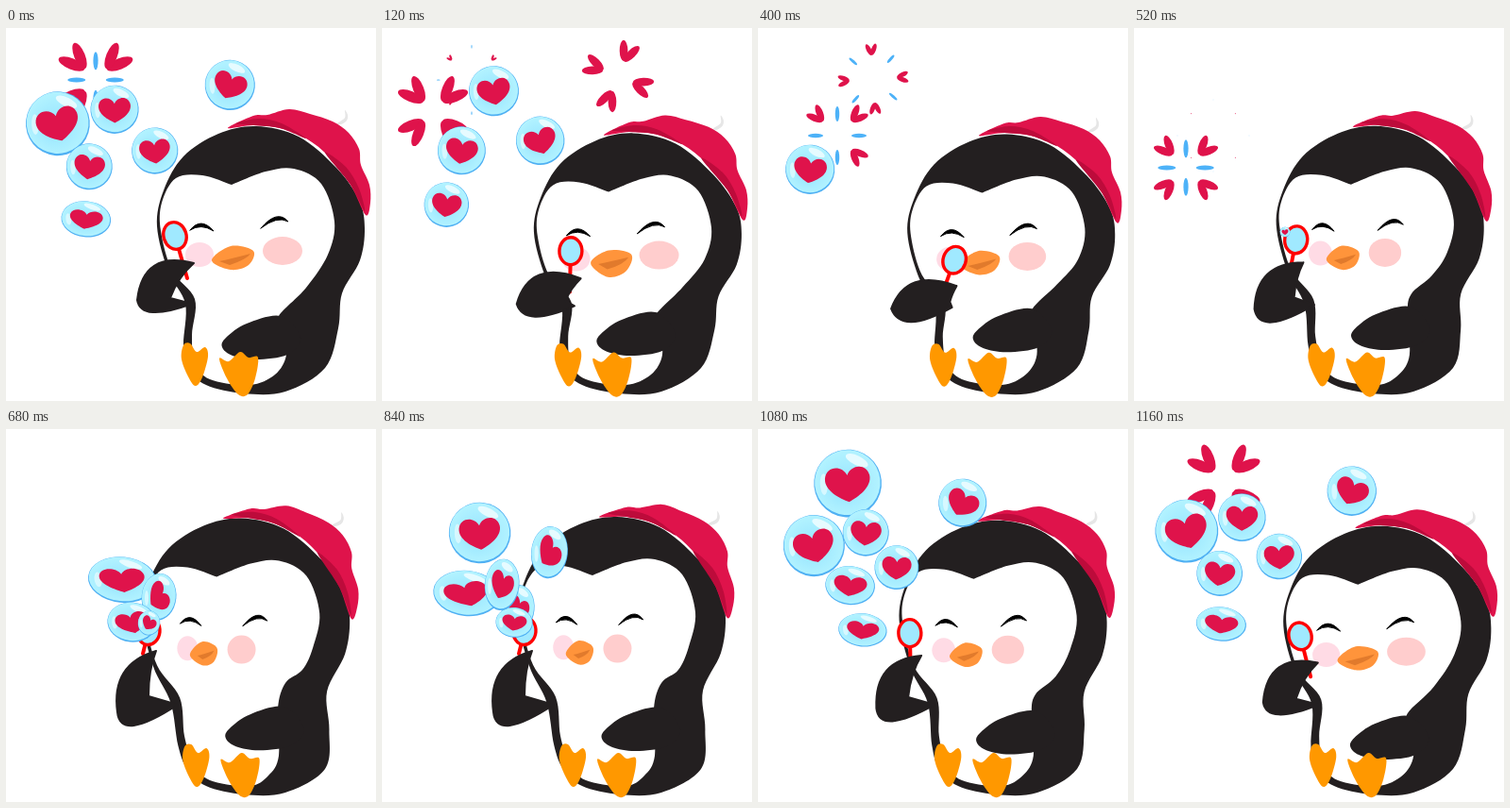
Recreate the animation shown at these times as an HTML page with a canvas. Size 392 by 395 pixels, loop 1200 ms.

```html
<!DOCTYPE html>
<html lang="en">
<head>
<meta charset="utf-8">
<title>Penguin blowing bubbles</title>
<style>
html, body { margin: 0; width: 100%; height: 100%; overflow: hidden; background: #fff; }
canvas { display: block; width: 392px; height: 395px; }
</style>
</head>
<body>
<canvas id="stage" width="392" height="395"></canvas>
<script>
const ctx = document.getElementById('stage').getContext('2d');
const LOOP = 1200, STEP = 40, TAU = Math.PI * 2;
const BLACK = '#231f20', RED = '#df134b', DARK = '#bd0b3b';
const clamp = v => Math.max(0, Math.min(1, v));
const mix = (a, b, u) => a + (b - a) * u;
const ramp = (t, from, to) => {
  const u = clamp((t - from) / (to - from));
  return u * u * (3 - 2 * u);
};

// Outlines of the upright penguin; warp() leans and nods them.
const body = [265, 104, 310, 115, 350, 148, 374, 182, 380, 212, 375, 246, 356, 281, 352, 318, 338, 360,
  296, 385, 252, 387, 212, 378, 192, 360, 188, 335, 190, 292, 172, 258, 160, 210, 167, 172, 188, 136, 225, 112];
const wing = [291, 305, 255, 313, 233, 328, 229, 338, 240, 347, 265, 351, 298, 346, 312, 328];
const leftFoot = [188, 336, 195, 334, 202, 343, 211, 338, 214, 348, 208, 370, 201, 379, 194, 371, 186, 351];
const rightFoot = [226, 350, 236, 353, 248, 343, 257, 349, 267, 349, 264, 371, 256, 388, 246, 388, 234, 371];
const hat = [235, 106, 262, 93, 277, 92, 300, 86, 322, 91, 346, 99, 363, 111, 374, 128, 376, 145,
  385, 166, 386, 185, 381, 198, 365, 166, 343, 137, 318, 117, 290, 106, 262, 103];

function curve(v, open) {
  const n = v.length / 2;
  const p = i => {
    const j = open ? Math.max(0, Math.min(n - 1, i)) : (i + n) % n;
    return [v[2 * j], v[2 * j + 1]];
  };
  ctx.beginPath();
  ctx.moveTo(v[0], v[1]);
  for (let i = 0; i < (open ? n - 1 : n); i++) {
    const [a, b, c, d] = [p(i - 1), p(i), p(i + 1), p(i + 2)];
    ctx.bezierCurveTo(b[0] + (c[0] - a[0]) / 6, b[1] + (c[1] - a[1]) / 6,
      c[0] - (d[0] - b[0]) / 6, c[1] - (d[1] - b[1]) / 6, c[0], c[1]);
  }
  ctx.closePath();
}
function blob(v, color, open) {
  curve(v, open);
  ctx.fillStyle = color;
  ctx.fill();
}
function oval(x, y, rx, ry, color, tilt = 0) {
  ctx.beginPath();
  ctx.ellipse(x, y, rx, ry, tilt, 0, TAU);
  ctx.fillStyle = color;
  ctx.fill();
}
function local(x, y, angle, draw) {
  ctx.save();
  ctx.translate(x, y);
  ctx.rotate(angle);
  draw();
  ctx.restore();
}
const move = (v, dx, dy) => v.map((n, i) => n + (i % 2 ? dy : dx));

function poseAt(t) {
  return {
    lean: ramp(t, 290, 680) - ramp(t, 1000, 1200),
    nod: ramp(t, 0, 220) - ramp(t, 250, 800),
    reach: ramp(t, 20, 230) - ramp(t, 300, 620),
    open: ramp(t, 80, 220) - ramp(t, 260, 400)
  };
}

// The higher a point, the more it follows the head.
function warp(v, { lean, nod }) {
  return v.map((n, i) => {
    const y = v[i | 1], k = clamp((360 - y) / 180);
    return i % 2
      ? n + 13 * nod * k - 11 * lean * clamp((310 - y) / 80)
      : n + 2 * nod * k - 16 * lean * clamp((360 - y) / 70);
  });
}

function drawBody(p) {
  blob(warp(body, p), BLACK);
  const right = warp([239, 166, 275, 152, 305, 149, 334, 165, 348, 205, 341, 240], p);
  const left = warp([258, 378, 216, 372, 200, 354, 197, 325, 200, 287, 176, 257, 164, 215, 165, 185,
    180, 159, 208, 156, 239, 166], p);
  const l = p.lean;
  const side = [318 - 4 * l, 275 - 20 * l, 289 + 7 * l, 305 - 36 * l, 293 - 5 * l, 318 - 22 * l,
    297 - 8 * l, 346, 285 - 7 * l, 367];
  blob([...right, ...side, ...left], '#fff', true);
  blob(move(wing, 4 * l - 2 * p.nod, -10 * l - 7 * p.nod), BLACK);
}

function drawHat({ lean, nod }) {
  local(235 - 5 * lean, 106 - 13 * lean + 13 * nod, .105 * lean - .025 * nod, () => {
    ctx.translate(-235, -106);
    blob([351, 101, 359, 95, 359, 87, 362, 92, 361, 98, 355, 102], '#e6e6e6');
    blob(hat, RED);
    blob([244, 101, 268, 96, 292, 101, 318, 117, 290, 106, 262, 103], DARK);
    blob([338, 132, 360, 147, 374, 170, 380, 194, 365, 166], DARK);
  });
}

function drawEye(x0, y0, px, py, x1, y1) {
  const cx = 2 * px - (x0 + x1) / 2, cy = 2 * py - (y0 + y1) / 2;
  ctx.beginPath();
  ctx.moveTo(x0, y0);
  ctx.quadraticCurveTo(cx, cy, x1, y1);
  ctx.quadraticCurveTo(cx, cy + 7, x0, y0);
  ctx.fillStyle = ctx.strokeStyle = '#000';
  ctx.lineWidth = 1;
  ctx.fill();
  ctx.stroke();
}

function drawFace({ lean, nod, open }) {
  // Turning the head narrows the face, the lower half most.
  const turn = (v, squeeze, drop) => v.map((n, i) => {
    const d = v[i & ~1] - 200;
    return i % 2 ? n - lean * (9 - .06 * d) + drop * nod : n - lean * (11 + squeeze * d) + nod;
  });
  const low = v => turn(v, .35, 8);
  oval(...low([205, 240]), 15 - 4 * lean, 13, '#ffdbe5');
  oval(...low([293, 236]), 21 - 6 * lean, 15, '#ffcdcd');
  drawEye(...turn([195, 214, 207, 207, 220, 215], .115, 10));
  drawEye(...turn([270, 212, 286, 200, 299, 205], .115, 10));

  const o = open, b = move(low([218 + 5 * o, 246 - 8 * o, 238, 231, 262, 236 - 4 * o,
    257 - 3 * o, 251 + 10 * o, 238 - 4 * o, 256 + 16 * o]), 8 * o - 6 * lean, 0);
  const [lx, ly, , , rx, ry, qx, qy, bx, by] = b;
  blob(b, '#ff943b');
  ctx.beginPath();
  ctx.moveTo(lx + 8, ly + 1);
  ctx.quadraticCurveTo(mix(lx, rx, .5), mix(ly, ry, .5) + 3, rx - 3, ry + 3);
  ctx.quadraticCurveTo(mix(rx, qx, .8) - 3, mix(ry, qy, .6), mix(lx, bx, .8) + 3, mix(ly + 5, by - 2, o));
  ctx.closePath();
  ctx.fillStyle = '#e17a2c';
  ctx.fill();
}

function drawArm({ lean, reach }) {
  const at = (x, y, rx, ry, lx, ly) => [x + rx * reach + lx * lean, y + ry * reach + ly * lean];

  const [x, y] = at(179, 220, 45, 35, -28, -6);
  const [hx, hy] = at(13, 45, -30, -4, -19, -21);
  const d = Math.hypot(hx, hy);
  ctx.strokeStyle = '#f00';
  ctx.lineCap = 'round';
  ctx.lineWidth = 4;
  ctx.beginPath();
  ctx.moveTo(x + hx / d * 14, y + hy / d * 14);
  ctx.lineTo(x + hx, y + hy);
  ctx.stroke();
  oval(x, y, 12, 14.5, '#a0e9ff', -.3 + .7 * reach + .4 * lean);
  ctx.lineWidth = 3.4;
  ctx.stroke();

  const hand = at(199, 249, 25, 35, -40, -14);
  const elbow = at(139, 288, 8, 9, -21, 12);
  ctx.beginPath();
  ctx.moveTo(...hand);
  ctx.quadraticCurveTo(...at(145, 235, 25, 20, -34, 14), ...elbow);
  ctx.quadraticCurveTo(...at(143, 312, 17, 13, -22, 20), ...at(197, 292, 15, 5, -15, 0));
  ctx.lineTo(...at(174, 286, 44, 6, -23, -3));
  ctx.quadraticCurveTo(...at(182, 264, 38, 26, -31, -9), ...hand);
  ctx.fillStyle = ctx.strokeStyle = BLACK;
  ctx.lineWidth = 2;
  ctx.lineJoin = 'round';
  ctx.fill();
  ctx.stroke();
}

function drawPenguin(t) {
  const p = poseAt(t);
  drawBody(p);
  drawHat(p);
  const slide = 2 * p.lean - 5 * p.nod;
  blob(move(leftFoot, slide, p.nod), '#ff9800');
  blob(move(rightFoot, slide, p.nod), '#ff9800');
  drawFace(p);
  drawArm(p);
}

// Each bubble drifts from the ring, around "via", to the place where it pops.
const ring = [160, 216];
const bubbles = [
  { born: 520, pop: 1110, via: [98, 138], end: [95, 55], r: 33, stretch: 1, turn: -.08 },
  { born: 570, pop: 1310, via: [155, 118], end: [250, 51], r: 25, stretch: -1, turn: .2, twist: -.4 },
  { born: 610, pop: 1310, via: [56, 178], end: [54, 88], r: 32, stretch: 1, turn: -.25, plain: true },
  { born: 720, pop: 1330, via: [118, 167], end: [168, 119], r: 23.5, stretch: -1, turn: -.3, plain: true },
  { born: 770, pop: 1488, via: [80, 176], end: [84, 114], r: 24.5, stretch: 1, turn: .15 },
  { born: 640, pop: 1446, via: [95, 140], end: [122, 54], r: 25, stretch: -1, turn: -.3, twist: -.85 },
  { born: 930, pop: 1630, via: [61, 222], end: [55, 148], r: 24, stretch: 1, turn: .15 }
];

function heart() {
  ctx.beginPath();
  for (const s of [1, -1]) {
    ctx.moveTo(0, .46);
    ctx.bezierCurveTo(s * .2, .36, s * .54, .14, s * .5, -.16);
    ctx.bezierCurveTo(s * .45, -.47, s * .1, -.46, 0, -.2);
  }
  ctx.fillStyle = RED;
  ctx.fill();
}

function drawBubble(b, t) {
  if (t < b.born || t >= b.pop) return;
  const u = (t - b.born) / (b.pop - b.born), s = 1 - (1 - u) ** 1.4;
  const [x, y] = ring.map((n, i) => mix(mix(n, b.via[i], s), mix(b.via[i], b.end[i], s), s));
  const grow = 1 - (1 - clamp(u / .2 + .1)) ** 2;
  const r = b.r * grow * (.85 + .25 * u);
  const squash = .2 * b.stretch * Math.sin(Math.PI * clamp(u / .55));
  local(x, y, .1, () => {
    ctx.scale(r * (1 + squash), r * (1 - squash));
    oval(0, 0, 1, 1, '#4fb0f3');
    const glow = ctx.createRadialGradient(-.1, .1, .3, 0, 0, 1);
    glow.addColorStop(0, '#9ee8ff');
    glow.addColorStop(1, '#b3f3ff');
    oval(-.01, -.025, .97, .96, glow);
    oval(.2, -.7, .36, .14, '#e6fbff', .35);
    oval(-.7, .1, .11, .32, '#d6f8ff', -.15);
    ctx.rotate(b.turn + (b.stretch < 0 ? .9 * (1 - u) : 0) - .1);
    ctx.scale(1.32, 1.2);
    heart();
  });
}

function drawBurst(b, t) {
  const age = t - b.pop;
  if (age < 0 || age >= 240) return;
  const fade = Math.min(1, (240 - age) / 150), size = b.r / 33 * fade;
  for (let i = 0; i < 4; i++) {
    const a = (b.twist || 0) + (i + .5) * TAU / 4;
    local(...b.end, a, () => {
      ctx.translate(26 + age * .03, 0);
      ctx.rotate(Math.PI / 2);
      ctx.scale(26 * size, 27 * size);
      for (const s of [1, -1]) oval(s * .23, -.05, .22, .55, RED, s * .42);
    });
    if (!b.plain && age > 60) {
      local(...b.end, a + TAU / 8, () => oval(9 + age * .125, 0, 9.5 * fade, 2.6 * fade, '#4db2f8'));
    }
  }
}

function draw(t) {
  ctx.fillStyle = '#fff';
  ctx.fillRect(0, 0, 392, 395);
  drawPenguin(t);
  for (const part of [drawBurst, drawBubble]) {
    for (const b of bubbles) {
      part(b, t);
      part(b, t + LOOP);
    }
  }
}

const start = performance.now();
function tick() {
  const t = (performance.now() - start) % LOOP;
  draw(Math.floor(t / STEP) * STEP);
  requestAnimationFrame(tick);
}
tick();
</script>
</body>
</html>
```
